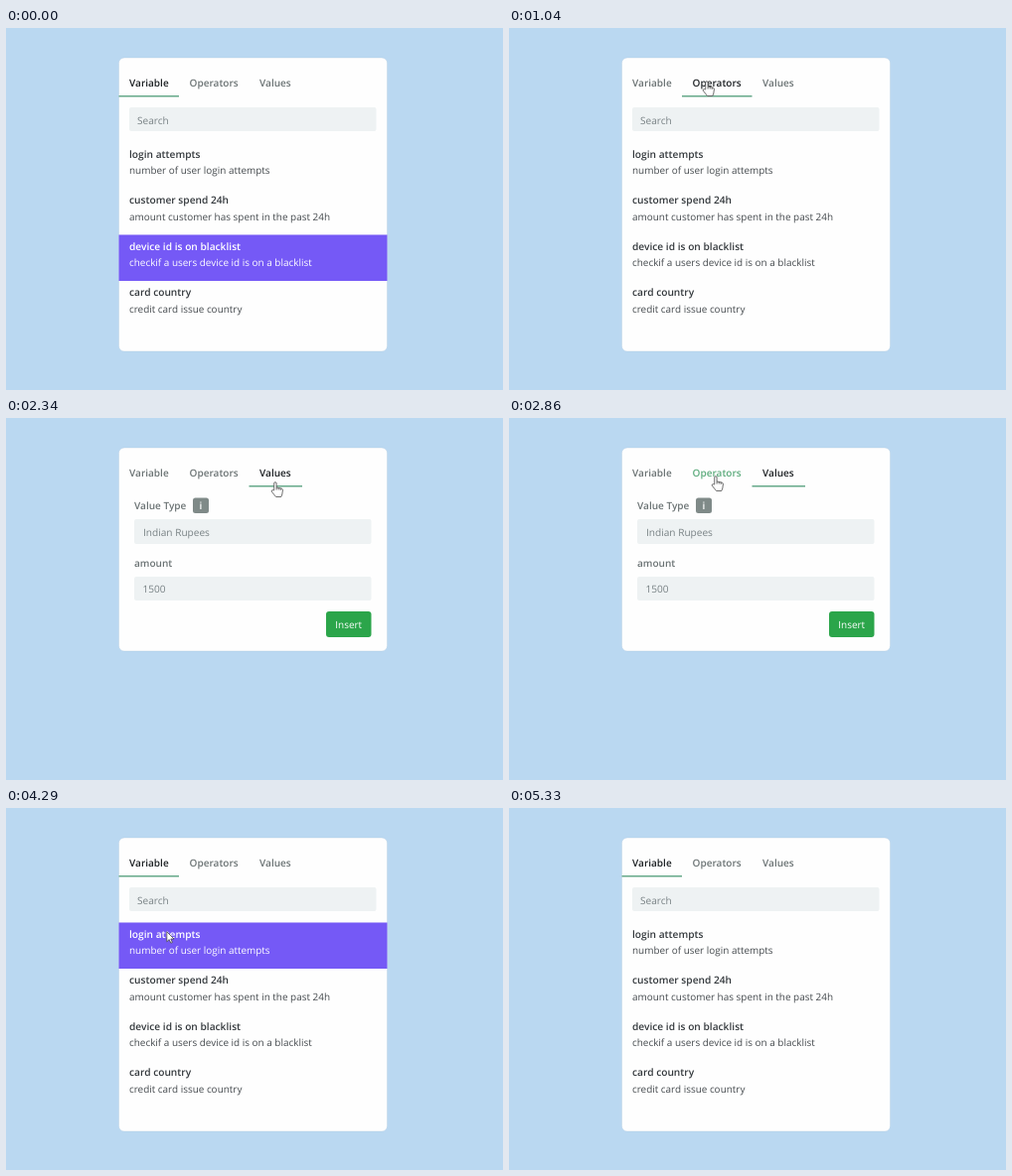
An HTML page that plays this animation: 500x365 px, repeating every 6630 ms.

```html
<!DOCTYPE html>
<html lang="en">
<head>
<meta charset="utf-8">
<title>Rule builder tabs</title>
<style>
  html, body { margin: 0; height: 100%; overflow: hidden; background: #bad8f1; }
  svg { display: block; width: 100%; height: 100%; }
  text { font: 9.95px "Open Sans", "Noto Sans", sans-serif; fill: #454a4e; text-rendering: geometricPrecision; }
  .title { font-weight: 600; font-size: 10.2px; fill: #34393d; }
  .tab, .label { font-weight: 600; font-size: 10.05px; fill: #6b7374; }
  .tab.hover { fill: #5cab7c; }
  .tab.active { fill: #1d2124; }
  .hint { fill: #788184; font-size: 10.1px; }
  .field { fill: #eef2f3; }
  .row rect { fill: none; }
  .row.on rect { fill: #7559f6; }
  .row.on text, .white { fill: #fff; }
</style>
</head>
<body>
<svg viewBox="0 0 500 365">
  <rect id="card" x="113.5" y="30" width="270" rx="5.5" fill="#fefefe" stroke="#a9c4da" stroke-opacity=".5" stroke-width=".6"/>
  <g id="tabs"></g>
  <rect id="line" y="68" height="1.5" fill="#66a98a"/>

  <g class="panel" id="variables">
    <rect class="field" x="124" y="80" width="248.5" height="24" rx="2"/>
    <text class="hint" x="132" y="96.5">Search</text>
  </g>

  <g class="panel">
    <text class="label" x="124" y="92">Write additional info.</text>
    <rect class="field" x="124" y="102" width="248.5" height="56.5" rx="2"/>
    <path d="M366.5 157.5l5-5M369.5 157.5l2-2" stroke="#777" stroke-width=".8"/>
  </g>

  <g class="panel">
    <text class="label" x="129" y="92">Value Type</text>
    <rect x="188" y="80.5" width="16" height="15.5" rx="2.5" fill="#7f8a88"/>
    <text class="title white" x="196" y="92" text-anchor="middle">i</text>
    <rect class="field" x="129" y="102" width="238.5" height="25" rx="2"/>
    <text class="hint" x="138" y="118.5">Indian Rupees</text>
    <text class="label" x="129" y="150">amount</text>
    <rect class="field" x="129" y="160" width="238.5" height="24" rx="2"/>
    <text class="hint" x="137.5" y="176">1500</text>
    <rect x="322" y="195" width="45.5" height="26" rx="3" fill="#2ba54a"/>
    <text class="white" x="344.7" y="211.7" text-anchor="middle">Insert</text>
  </g>

  <g id="cursor" fill="#fff" stroke="#4a4a4a" stroke-width=".8" stroke-linejoin="round">
    <path id="arrow" d="M0 0v10l2.4-2.2 1.6 3.6 1.6-.7-1.6-3.5h3.2z"/>
    <path id="hand" d="M-1.3 8V.9a1.2 1.2 0 0 1 2.4 0V5l5 1q1.5.4 1.3 2l-.6 4-1 2.5H.6l-4.3-5.2q-.6-1.6 1-1.6zM1.1 5v2.5M3.2 5.5v2M5.2 5.9v2"/>
  </g>
</svg>
<script>
const LOOP = 6630, STEP = 130, FADE = 130, EXIT = 5330;
const ROW_TOP = 115.5, ROW_H = 46.5, TAB_BOTTOM = 70;

const tabs = [
  { name: "Variable", left: 113.5, width: 60.5, cardHeight: 296 },
  { name: "Operators", left: 174, width: 70.5, cardHeight: 153.5 },
  { name: "Values", left: 244.5, width: 53.5, cardHeight: 205 }
];
const rows = [
  ["login attempts", "number of user login attempts"],
  ["customer spend 24h", "amount customer has spent in the past 24h"],
  ["device id is on blacklist", "checkif a users device id is on a blacklist"],
  ["card country", "credit card issue country"]
];

// A click selects the tab at once; its panel fades in from the swap time.
const clicks = [
  { tab: 1, at: 1040, swap: 1365 },
  { tab: 2, at: 1820, swap: 1820 },
  { tab: 0, at: 3510, swap: 3710 }
];

// Straight pointer moves, resting in between
const home = { x: 205, y: 240 };
const moves = [
  { from: 0, to: 780, x: 199, y: 54 },
  { from: 1300, to: 1690, x: 271, y: 65 },
  { from: 2600, to: 3120, x: 145, y: 53 },
  { from: 3250, to: 3770, x: 145, y: 72 },
  { from: 4030, to: EXIT, x: 229, y: 336 }
];

const $ = id => document.getElementById(id);
const clamp = v => Math.min(1, Math.max(0, v));
const show = (el, on) => el.style.display = on ? "" : "none";

$("tabs").innerHTML = tabs.map(({ name, left }) =>
  `<text class="tab" x="${left + 10.5}" y="58.5">${name}</text>`).join("");
$("variables").innerHTML += rows.map(([title, note], i) => {
  const y = ROW_TOP + i * ROW_H;
  return `<g class="row"><rect x="113.5" y="${y}" width="270" height="${ROW_H}"/>
    <text class="title" x="124" y="${y + 15.4}">${title}</text>
    <text x="124" y="${y + 31.6}">${note}</text></g>`;
}).join("");

const tabEls = document.querySelectorAll(".tab");
const rowEls = document.querySelectorAll(".row");
const panels = document.querySelectorAll(".panel");

function pointerAt(t) {
  let { x, y } = home;
  for (const m of moves) {
    const k = clamp((t - m.from) / (m.to - m.from));
    x += (m.x - x) * k;
    y += (m.y - y) * k;
  }
  return { x, y };
}

function draw(t) {
  const active = clicks.findLast(c => t >= c.at)?.tab ?? 0;
  const panel = clicks.findLast(c => t >= c.swap)?.tab ?? 0;
  const opacity = Math.min(...clicks.map(c => clamp(Math.abs(t - c.swap) / FADE)));
  const { x, y } = pointerAt(t);

  $("card").setAttribute("height", tabs[panel].cardHeight);
  $("line").setAttribute("x", tabs[active].left);
  $("line").setAttribute("width", tabs[active].width);
  tabEls.forEach((el, i) => {
    const { left, width } = tabs[i];
    el.classList.toggle("active", i === active);
    el.classList.toggle("hover", y < TAB_BOTTOM && x >= left && x < left + width);
  });
  panels.forEach((el, i) => {
    show(el, i === panel);
    el.style.opacity = opacity;
  });
  const row = Math.floor((y - ROW_TOP) / ROW_H);
  rowEls.forEach((el, i) => el.classList.toggle("on", i === row));

  const overTabs = y < TAB_BOTTOM + 5;
  show($("cursor"), t > 0 && t < EXIT);
  show($("hand"), overTabs);
  show($("arrow"), !overTabs);
  $("cursor").setAttribute("transform", `translate(${x} ${y})`);
}

const start = performance.now();
function tick() {
  const t = (performance.now() - start) % LOOP;
  draw(Math.floor(t / STEP) * STEP);
  requestAnimationFrame(tick);
}
tick();
</script>
</body>
</html>
```
